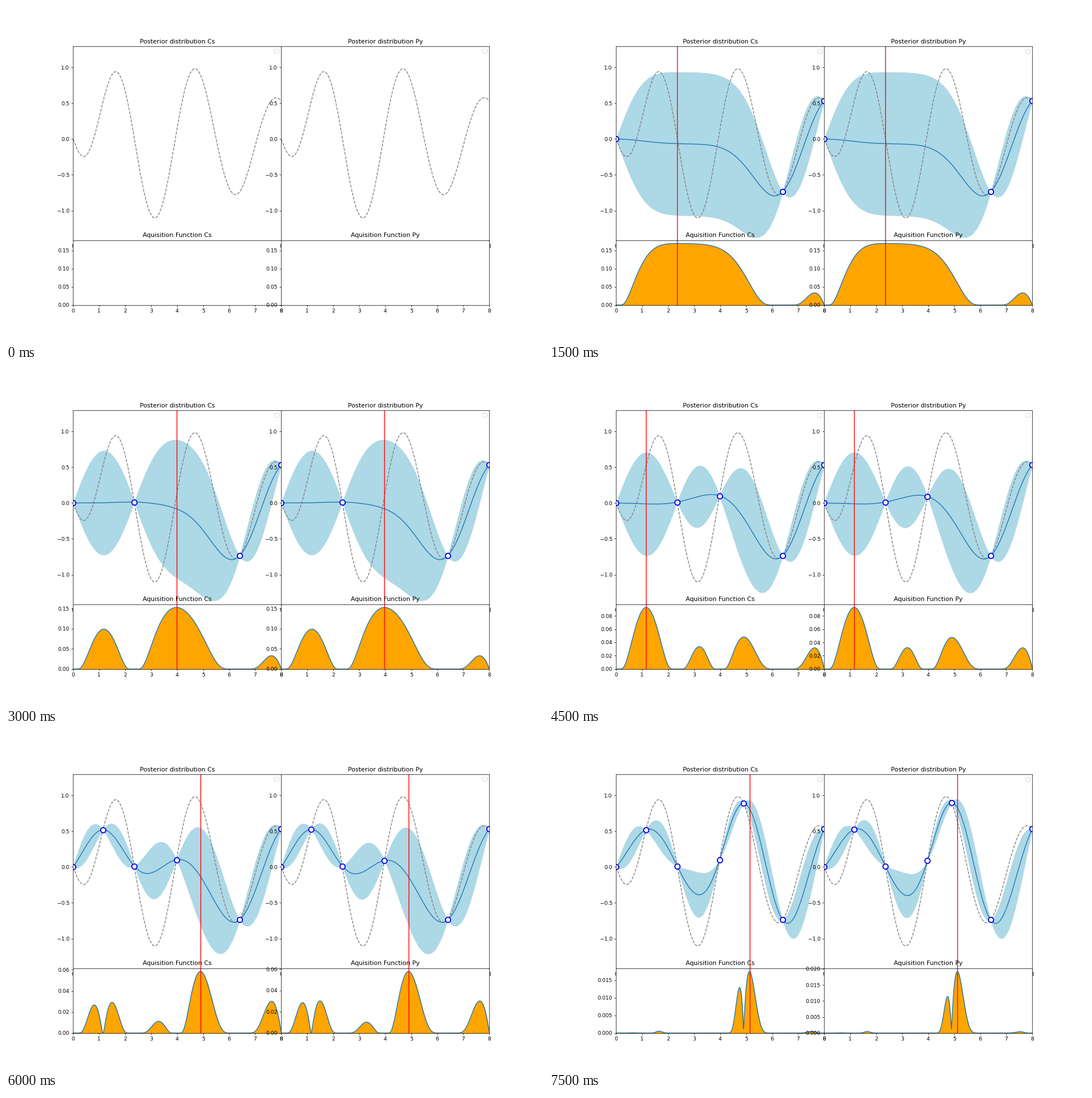
Write a matplotlib script that moves like this. It is 947 px wide and 592 px high and loops after 8 s.

```python
import math

import matplotlib.pyplot as plt
import numpy as np
from matplotlib.animation import FuncAnimation

DPI = 66
STEPS = 6
TICK = 500          # ms per animation frame
HOLD = 3            # animation frames per step
NOISE = 1e-5

grid = np.linspace(0, 8, 801)
erf = np.vectorize(math.erf)


def objective(x):
    return -x * np.exp(-x / 3) * np.cos(2 * x)


def kernel(a, b):
    return np.exp(-0.5 * (a[:, None] - b[None, :]) ** 2)


def posterior(x, y):
    """Mean and deviation of a unit RBF process centred on the data mean."""
    gain = np.linalg.solve(kernel(x, x) + NOISE * np.eye(len(x)), kernel(x, grid))
    mean = y.mean() + gain.T @ (y - y.mean())
    var = 1 - np.sum(kernel(x, grid) * gain, axis=0)
    return mean, np.sqrt(np.maximum(var, 1e-12))


def expected_improvement(mean, std, best):
    gap = mean - best
    z = gap / std
    pdf = np.exp(-z ** 2 / 2) / math.sqrt(2 * math.pi)
    cdf = (1 + erf(z / math.sqrt(2))) / 2
    return np.maximum(gap * cdf + std * pdf, 0)


class Panel:
    """One column: posterior on top, acquisition function below."""

    def __init__(self, fig, spec, column, name, picks):
        self.top = fig.add_subplot(spec[0, column])
        self.low = fig.add_subplot(spec[1, column])
        truth = objective(grid)
        pad = 0.15 * np.ptp(truth)
        self.top.plot(grid, truth, "--", color="gray")
        self.top.set(title=f"Posterior distribution {name}", xlim=(0, 8),
                     ylim=(truth.min() - pad, truth.max() + pad))
        self.top.legend(handles=[], loc="upper right")
        self.low.set(title=f"Aquisition Function {name}", xlim=(0, 8))

        self.layers, self.peaks = [[]], []
        for n in range(len(picks)):
            self.add_step(np.array([0, 6.4, 8] + picks[:n]), picks[n])
        self.peaks.insert(0, self.peaks[0])

    def add_step(self, x, pick):
        y = objective(x)
        mean, std = posterior(x, y)
        gain = expected_improvement(mean, std, y.max())
        self.layers.append([
            self.top.fill_between(grid, mean - std, mean + std, color="lightblue"),
            *self.top.plot(grid, mean, color="C0"),
            *self.top.plot(x, y, "o", ms=10, mew=2, mfc="white", mec="blue"),
            self.top.axvline(pick, color="red"),
            self.low.fill_between(grid, 0, gain, color="orange"),
            *self.low.plot(grid, gain, color="C0"),
            self.low.axvline(pick, color="red"),
        ])
        self.peaks.append(gain.max())

    def show(self, step):
        for k, layer in enumerate(self.layers):
            for artist in layer:
                artist.set_visible(k == step)
        self.low.set_ylim(0, 1.05 * self.peaks[step])


fig = plt.figure(figsize=(947 / DPI, 592 / DPI), dpi=DPI)
spec = fig.add_gridspec(2, 2, height_ratios=[3, 1], hspace=0, wspace=0)
panels = [
    Panel(fig, spec, 0, "Cs", [2.35, 3.975, 1.148, 4.9, 5.13]),
    Panel(fig, spec, 1, "Py", [2.35, 3.97, 1.152, 4.89, 5.115]),
]


def update(i):
    for panel in panels:
        panel.show(i // HOLD)
    return []


anim = FuncAnimation(fig, update, frames=16, init_func=lambda: update(0),
                     interval=TICK, repeat=True, repeat_delay=0, blit=False)
plt.show()
```
